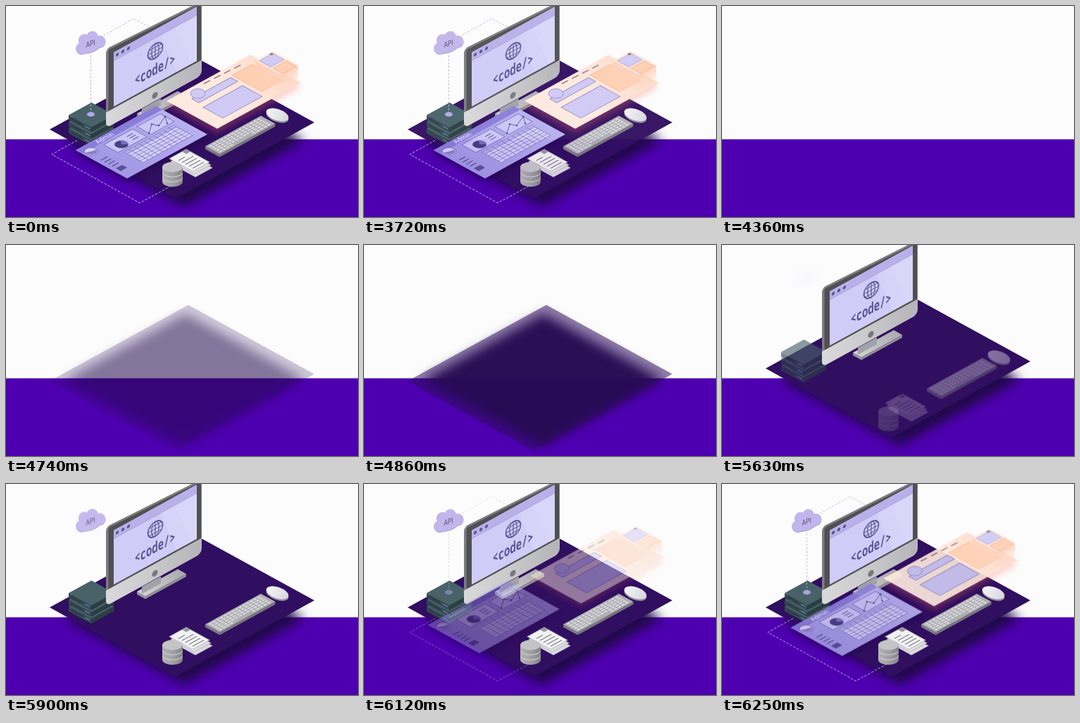
An HTML page with a canvas for the animation above (6.32 s loop, 500x300 px).

```html
<!DOCTYPE html>
<html lang="en">
<head>
<meta charset="utf-8">
<title>Isometric desk</title>
<style>
html, body { margin: 0; width: 100%; height: 100%; overflow: hidden; background: #fcfcfc; }
canvas { display: block; width: 100vw; height: 100vh; }
</style>
</head>
<body>
<canvas id="stage" width="500" height="300"></canvas>
<script>
const W = 500, H = 300, LOOP = 6320;
const HORIZON = 189.5;
const SLOPE = 0.55; // of both ground axes and of the screen

let g; // context being drawn on

function sheet() {
  const c = document.createElement('canvas');
  c.width = W;
  c.height = H;
  return c.getContext('2d');
}
function within(matrix, draw) {
  g.save();
  g.transform(...matrix);
  draw();
  g.restore();
}
// Ground: u runs up right, v runs down right. Wall: x runs up right, y down.
const ground = (x, y, draw) => within([1, -SLOPE, 1, SLOPE, x, y], draw);
const wall = (x, y, draw, slope = SLOPE) => within([1, -slope, 0, 1, x, y], draw);

function paint(fill, stroke, width = 0.8) {
  if (fill) { g.fillStyle = fill; g.fill(); }
  if (stroke) { g.strokeStyle = stroke; g.lineWidth = width; g.stroke(); }
}
function rect(x, y, w, h, fill, stroke, radius = 0) {
  g.beginPath();
  g.roundRect(x, y, w, h, radius);
  paint(fill, stroke);
}
function oval(x, y, rx, ry, fill, stroke, width, turn = 0) {
  g.beginPath();
  g.ellipse(x, y, rx, ry, turn, 0, Math.PI * 2);
  paint(fill, stroke, width);
}
function slice(x, y, r, from, to, fill) {
  g.beginPath();
  g.moveTo(x, y);
  g.arc(x, y, r, from, to);
  paint(fill);
}
function line(pts, color, width = 1, dash = []) {
  g.setLineDash(dash);
  g.beginPath();
  for (let i = 0; i < pts.length; i += 2) g.lineTo(pts[i], pts[i + 1]);
  paint(null, color, width);
  g.setLineDash([]);
}
const tile = (x, y, u, v, fill, stroke) => ground(x, y, () => rect(0, 0, u, v, fill, stroke));

// Block seen from above, placed by the left corner of its top
function block(x, y, u, v, h, top, left, right) {
  within([1, SLOPE, 0, 1, x, y], () => rect(0, 0, v, h, left));
  wall(x + v, y + v * SLOPE, () => rect(0, 0, u, h, right));
  tile(x, y, u, v, top);
}
function ramp(x0, y0, x1, y1, ...colors) {
  const r = g.createLinearGradient(x0, y0, x1, y1);
  colors.forEach((c, i) => r.addColorStop(i / (colors.length - 1), c));
  return r;
}
function label(text, x, y, font, color, stretch = 1) {
  within([stretch, 0, 0, 1, x, y], () => {
    g.font = font;
    g.fillStyle = color;
    g.textAlign = 'center';
    g.textBaseline = 'middle';
    g.fillText(text, 0, 0);
  });
}
function cast(color, blur, dy, draw) {
  g.save();
  g.shadowColor = color;
  g.shadowBlur = blur;
  g.shadowOffsetY = dy;
  draw();
  g.restore();
}

function shadow() {
  g.filter = 'blur(8px)';
  tile(84, 192, 171, 169, 'rgba(30,10,69,.97)');
  g.filter = 'none';
}

function platform() {
  tile(62, 175.5, 197, 179, '#300e60');
}

function servers() {
  for (let i = 2; i >= 0; i--) {
    const y = 155 + i * 9.5;
    block(89, y, 32.5, 32, 7, '#49626a', '#33494f', '#2b3e43');
    line([92, y + 5, 108, y + 13.5], '#24363b', 1.2);
    line([112, y + 16, 119, y + 19.5], '#5d78a0', 1.6);
  }
}

function cloud() {
  const shape = (dy, color) => {
    for (let i = 0; i < 4; i++) {
      const a = 3 + i * 0.9;
      oval(121.5 + 14 * Math.cos(a), 58 + dy + 14 * Math.sin(a), 8.3, 8.3, color);
    }
    oval(121, 55 + dy, 19, 10, color, null, 0, -0.45);
  };
  shape(1, '#a99ddb');
  shape(0, '#c0b6ec');
  wall(120, 54, () => label('API', 0, 0, '11px Roboto, sans-serif', '#55506f', 0.76), 0.3);
}

function links() {
  const c = '#bcb1ea';
  line([139, 42, 181, 18, 212, 34], c, 0.9, [3, 2]);
  line([120.5, 70, 120.5, 152], c, 0.9, [3, 2]);
  oval(120.5, 154, 5.5, 3.2, '#b3a8e6');
}

function route() {
  line([101, 191, 65, 211, 190, 280, 238, 254], '#c9bdf2', 0.9, [3.5, 2]);
}

function globe(x, y, r, color) {
  oval(x, y, r, r, null, color, 1.6);
  oval(x, y, r / 2, r, null, color, 1.2);
  line([x, y - r, x, y + r], color, 1.2);
  for (let k = -0.5; k <= 0.5; k += 0.5) {
    const half = r * Math.sqrt(1 - k * k);
    line([x - half, y + k * r, x + half, y + k * r], color, 1.1);
  }
}

function monitor() {
  const ink = '#5b5392';
  block(186, 153, 58, 12, 4, ramp(0, 0, 58, 0, '#d2d2d5', '#aaaab0'), '#96969c', '#8f8f95');
  wall(193, 146, () => rect(0, 0, 27, 10, '#a2a2a8'));
  wall(142, 0, () => {
    rect(0, 61, 136, 96, '#7d7d80', null, 6);
    rect(3.5, 64, 131.5, 92, '#505054', null, 3);
  }, 0.5);
  wall(142, 0, () => {
    rect(0, 151.5, 136, 22, ramp(0, 0, 136, 0, '#d9d9db', '#c9c9cc', '#b4b4b8'), null, [0, 0, 7, 7]);
    rect(11, 72, 118, 77, '#d0ccf7');
    g.save();
    g.clip();
    within([1, 0, 0.35, 1, 48, 0], () => {
      rect(0, 72, 90, 80, 'rgba(255,255,255,.12)');
      rect(20, 72, 70, 80, 'rgba(255,255,255,.08)');
    });
    g.restore();
    rect(11, 72, 118, 12, '#b9b0e9');
    line([11, 84, 129, 84], '#a298d6', 0.8);
    for (let i = 0; i < 3; i++) oval(16 + i * 8, 77.8, 2.2, 2.3, ink);
    globe(70, 102.5, 10.5, ink);
    label('<code/>', 69.5, 130, 'bold 21px "Noto Sans Mono", "DejaVu Sans Mono", monospace', ink, 0.66);
    oval(69.5, 165.2, 4, 4.2, '#77777c');
  });
}

function keyboard() {
  block(283, 199.5, 79, 20.5, 4, '#aeaeb3', '#7d7d83', '#77777d');
  ground(283, 199.5, () => {
    for (let r = 0; r < 5; r++) {
      for (let k = 0; k < 14; k++) {
        const gap = r === 4 && k > 3 && k < 9;
        if (!gap) rect(2.5 + k * 5.3, 1.8 + r * 3.6, 3.7, 2.3, '#dadadd');
      }
    }
  });
}

function mouse() {
  oval(385.5, 157, 16.5, 8, '#8e8e96', null, 0, 0.33);
  oval(385.5, 154.6, 16.5, 8, ramp(372, 150, 398, 162, '#f3f3f6', '#d8d8df'), null, 0, 0.33);
}

function papers() {
  for (let i = 2; i >= 0; i--) tile(232 + i * 2, 217 + i * 4, 24, 33, i ? '#dcdce0' : '#f1f1f3', '#b0b0b8');
  ground(232, 217, () => {
    rect(18, 0, 6, 6, '#96969f');
    for (let i = 0; i < 5; i++) line([4, 9 + i * 5, i ? 20 : 13, 9 + i * 5], '#5c5c66', 0.9);
  });
}

function disks() {
  const side = ramp(222, 0, 251, 0, '#b2b2b4', '#a2a2a4', '#828286');
  for (let i = 2; i >= 0; i--) {
    const y = 229 + i * 7.3;
    g.beginPath();
    g.ellipse(236.5, y + 6.2, 14.5, 7.2, 0, 0, Math.PI);
    g.lineTo(222, y);
    g.lineTo(251, y);
    paint(side);
    oval(236.5, y, 14.5, 7.2, i ? '#cfcfd1' : '#c4c4c6');
  }
}

function table(x, y, w, h, cols, rows, color) {
  rect(x, y, w, h, '#d3cef9', color);
  rect(x, y, w, h / rows, '#b4abeb');
  for (let i = 1; i < cols; i++) line([x + i * w / cols, y, x + i * w / cols, y + h], color, 0.6);
  for (let i = 1; i < rows; i++) line([x, y + i * h / rows, x + w, y + i * h / rows], color, 0.6);
}

function admin() {
  const ink = '#4c4284', soft = '#7a6fba', pale = '#cbc5f7';
  ground(99, 205, () => {
    cast('rgba(20,0,60,.4)', 10, 5, () => rect(0, 0, 114, 73, ramp(0, 0, 114, 0, '#a096e3', '#b8b0f0')));
    rect(0, 0, 114, 9, '#8a7dd8');
    rect(27, 13, 41, 20, pale, soft);
    rect(74, 13, 33, 20, pale, soft);
    table(32, 37, 70, 27, 10, 6, soft);
    label('Admin', 36, 5, '9px Roboto, sans-serif', '#f1edff', 0.9);
    // side column
    oval(9.3, 12.7, 7, 7, '#d9d2fa', soft);
    slice(9.3, 12.7, 6, 0.2, 3.6, '#8b7fcb');
    for (let i = 0; i < 4; i++) line([5, 31 + i * 5.2, 14, 31 + i * 5.2], ink, 1.1);
    rect(5, 52, 9, 7, '#5c509a');
    // pie
    oval(40, 25, 7, 7, '#4a3f83');
    slice(40, 25, 7, -0.9, 0.7, '#7d70bd');
    for (let i = 0; i < 3; i++) line([54, 19 + i * 4, 62, 19 + i * 4], ink, 0.9);
  });
  const trend = [203, 181, 207, 168, 217, 170, 226, 157, 229, 167];
  line(trend, ink, 0.8);
  for (let i = 0; i < trend.length; i += 2) oval(trend[i], trend[i + 1], 1.3, 1.1, ink);
}

function layout() {
  const lilac = '#d0caf5', edge = '#8980c0', peach = '#ffcfb2', rim = '#f3b48f', mark = '#8a7b80';
  ground(228, 135, () => {
    const skin = ramp(0, 0, 119, 40, '#fdeae0', '#fee9de', '#fddccb');
    cast('rgba(255,110,90,.3)', 8, 6, () => rect(0, 0, 119, 72, skin));
  });
  for (let i = 0; i < 4; i++) line([281 + i * 14.4, 110.5 - i * 7.3, 290 + i * 14.4, 105.8 - i * 7.3], mark, 1.5);
  tile(264, 132, 55, 10, lilac, edge);
  oval(272.5, 124.5, 10.5, 6.8, lilac, edge);
  tile(280, 144, 56, 28, lilac, edge);
  tile(321, 98.5, 28, 42, peach, rim);
  // raised card
  const fade = ramp(0, 0, 0, 27, 'rgba(255,205,180,.95)', 'rgba(255,215,195,0)');
  block(354, 78, 25, 36, 28, '#fde5d8', fade, fade);
  tile(360, 78, 19, 16, lilac, '#b4abdb');
  tile(379, 88.5, 19, 14, peach, rim);
  oval(377, 68.3, 2.6, 1.5, mark);
}

// draw, start, offset at the start, duration
const parts = [
  [shadow, 4640, 0, 0, 220],
  [platform, 4660, 0, 18, 380],
  [servers, 5440, -14, -8],
  [cloud, 5620, 0, -8],
  [links, 5975, 0, 0],
  [monitor, 5120, -26, -15],
  [route, 5975, 0, 0],
  [keyboard, 5500, 14, 8],
  [mouse, 5500, 14, 8],
  [layout, 5975, 16, -9],
  [admin, 5975, -16, -9],
  [papers, 5560, 0, 10],
  [disks, 5560, 0, 10]
].map(([draw, start, dx, dy, time = 300]) => {
  g = sheet();
  g.lineJoin = 'round';
  draw();
  return { draw, image: g.canvas, start, end: start + time, dx, dy };
});

const stage = document.getElementById('stage').getContext('2d');
const scene = sheet();
const span = (t, a, b) => Math.min(1, Math.max(0, (t - a) / (b - a)));
const smooth = p => p * p * (3 - 2 * p);

function render(t) {
  const entering = t >= 4400;
  scene.clearRect(0, 0, W, H);
  for (const part of parts) {
    const p = entering ? span(t, part.start, part.end) : 1;
    if (!p) continue;
    // the platform fades in first and then lifts
    const rest = part.draw === platform && entering ? 1 - smooth(span(t, 4850, 5160)) : 1 - p;
    scene.globalAlpha = p;
    scene.drawImage(part.image, part.dx * rest, part.dy * rest);
  }
  stage.globalAlpha = 1;
  stage.fillStyle = '#fcfcfc';
  stage.fillRect(0, 0, W, H);
  stage.fillStyle = '#4e00b0';
  stage.fillRect(0, HORIZON, W, H - HORIZON);
  stage.globalAlpha = entering || t < 3720 ? 1 : 1 - span(t, 3695, 4335);
  stage.drawImage(scene.canvas, 0, 0);
}

const begin = performance.now();
function tick() {
  render((performance.now() - begin) % LOOP);
  requestAnimationFrame(tick);
}
tick();
</script>
</body>
</html>
```
